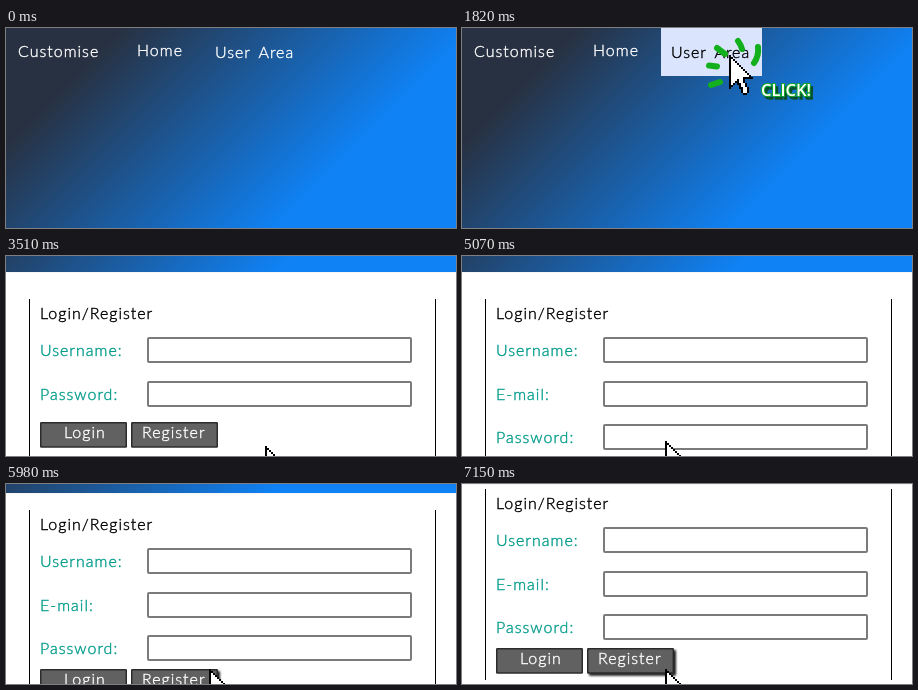
Recreate the animation shown at these times as an HTML page. Size 450x200 px, loop 8190 ms.

```html
<!DOCTYPE html>
<html lang="en">
<head>
<meta charset="utf-8">
<title>Login walkthrough</title>
<style>
  html, body { margin: 0; width: 100%; height: 100%; overflow: hidden; background: #fff; }
  svg { display: block; width: 450px; height: 200px; }
  text { font: 300 16px Lato, "Open Sans", sans-serif; letter-spacing: 1px; word-spacing: 3px; white-space: pre; }
  .dark { fill: #000; stroke: #000; stroke-width: .4; }
  .label { fill: #009b8a; stroke: #009b8a; stroke-width: .4; }
  .light { fill: #fff; stroke: #fff; stroke-width: .4; }
  .field { fill: #fff; stroke: #7b7b7b; stroke-width: 2; }
  .button { fill: #616161; stroke: #2c2c2c; stroke-width: 1.5; }
  .rays { fill: none; stroke: #12b01c; stroke-width: 6; stroke-linecap: round; }
  .click { font: 600 16.5px "Open Sans", "Noto Sans", sans-serif; letter-spacing: 0; }
  .click.edge { fill: #fff; stroke: #12a82a; stroke-width: 2; paint-order: stroke; stroke-linejoin: round; }
  .click.shade { fill: #08502c; stroke: #08502c; stroke-width: 1.5; }
</style>
</head>
<body>
<svg viewBox="0 0 450 200">
  <defs>
    <linearGradient id="sky" gradientUnits="userSpaceOnUse" x1="57.5" y1="57.5" x2="235" y2="235">
      <stop offset="0" stop-color="#283141"/>
      <stop offset="1" stop-color="#0f82f5"/>
    </linearGradient>
    <filter id="lift" x="-10%" y="-20%" width="120%" height="150%">
      <feDropShadow dx="2" dy="2" stdDeviation="1.2" flood-color="#000" flood-opacity=".9"/>
    </filter>
  </defs>
  <rect width="450" height="200" fill="#fff"/>

  <g id="form">
    <path fill="none" stroke="#000" d="M23.5 43V234M429.5 43V234"/>
    <text class="dark" x="34" y="63">Login/Register</text>
    <g id="rows"></g>
    <g id="buttons">
      <rect class="button" x="34.75" y=".75" width="85.5" height="24.25" rx=".5"/>
      <text class="light" x="58" y="16">Login</text>
      <rect class="button" id="register" x="125.75" y=".75" width="85.5" height="24.25" rx=".5"/>
      <text class="light" x="136" y="16">Register</text>
    </g>
  </g>

  <g id="header">
    <rect y="200" width="450" height="1" fill="#f6f6f6"/>
    <rect width="450" height="200" fill="url(#sky)"/>
  </g>

  <g id="home">
    <rect id="tab" x="199" width="101" height="48" fill="#dbe4fd"/>
    <text class="light" x="12" y="29">Customise</text>
    <text class="light" x="131" y="28">Home</text>
    <text id="area" x="209" y="30">User Area</text>
  </g>

  <g id="pointer">
    <g id="burst">
      <path class="rays" d="M-20 10.5L-12 11.5M-12 -7L-4 -1M9 -14Q12 -10 13 -6M29 -8Q30 1 25 8M-18 30L-9 27"/>
      <g id="word">
        <text class="click shade" x="2.5" y="2.5">CLICK!</text>
        <text class="click edge">CLICK!</text>
      </g>
    </g>
    <g transform="scale(2)" shape-rendering="crispEdges">
      <path id="rim"/>
      <path id="fill" fill="#fff"/>
    </g>
  </g>
</svg>
<script>
  const LOOP = 8190, STEP = 130;
  const FORM_AT = 2470, MOVE_AT = 2600, SCROLL_AT = 5070;
  const $ = id => document.getElementById(id);
  const show = (id, on) => $(id).setAttribute('display', on ? 'inline' : 'none');
  const place = (id, value) => $(id).setAttribute('transform', value);
  const stairs = n => 'h1v1'.repeat(n);

  $('rim').setAttribute('d', 'M0 0' + stairs(12) +
    'H8v2h1v2h1v3h-1v1h-2v-1h-1v-2h-1v-2h-1v-1h-1v1h-1v1h-1v1h-1z');
  $('fill').setAttribute('d', 'M1 2' + stairs(9) +
    'H7v3h1v2h1v3h-2v-3h-1v-2h-1v-2h-1v1h-1v1h-1v1h-1z');

  // Straight glide that arrives on step 11; the click then grows for 3 steps.
  const visits = {
    home: { x: 267, y: 27, dx: 16.5, dy: 15.75, word: [32, 41] },
    form: { x: 203, y: 185, dx: 14.2, dy: 1.4, word: [21, -18] }
  };

  function drawPointer(visit, step, clicking) {
    const left = Math.max(0, 11 - step);
    const x = Math.floor(visit.x + visit.dx * left);
    const y = Math.floor(visit.y + visit.dy * left);
    const grow = clicking ? Math.min(1, Math.max(0, (step - 11) / 3)) : 0;
    place('pointer', `translate(${x} ${y})`);
    place('word', `translate(${visit.word})`);
    place('burst', `scale(${grow})`);
    show('burst', grow > 0);
    return { x, y };
  }

  let shownRows = '';
  function drawRows(names) {
    if (names.join() === shownRows) return;
    shownRows = names.join();
    $('rows').innerHTML = names.map((name, i) => {
      const y = 82 + Math.round(i * 43.5);
      return `<text class="label" x="34" y="${y + 18}">${name}:</text>` +
        `<rect class="field" x="142" y="${y}" width="263" height="24" rx="1"/>`;
    }).join('');
  }

  function draw(ms) {
    const onHome = ms < FORM_AT;
    const signUp = ms >= SCROLL_AT;
    const step = Math.floor((onHome ? ms : ms - MOVE_AT) / STEP);
    const tip = drawPointer(onHome ? visits.home : visits.form, step, !signUp);
    show('pointer', onHome ? step > 0 : ms > MOVE_AT);
    show('home', onHome);
    show('form', !onHome);

    const overTab = tip.x < 300 && tip.y < 48;
    show('tab', overTab);
    $('area').setAttribute('class', overTab ? 'dark' : 'light');

    const scroll = signUp ? Math.min(16, Math.floor((ms - SCROLL_AT) / STEP)) : 0;
    const shift = Math.round(scroll * 2.375);
    const buttonTop = signUp ? 202 : 166;
    place('header', `translate(0 ${onHome ? 0 : -184 - scroll})`);
    place('form', `translate(0 ${-shift})`);
    place('buttons', `translate(0 ${buttonTop})`);
    drawRows(signUp ? ['Username', 'E-mail', 'Password'] : ['Username', 'Password']);

    const overButton = tip.x < 212 && tip.y >= buttonTop - shift;
    $('register').setAttribute('filter', overButton ? 'url(#lift)' : 'none');
  }

  const start = performance.now();
  function tick() {
    draw((performance.now() - start) % LOOP);
    requestAnimationFrame(tick);
  }
  tick();
</script>
</body>
</html>
```
